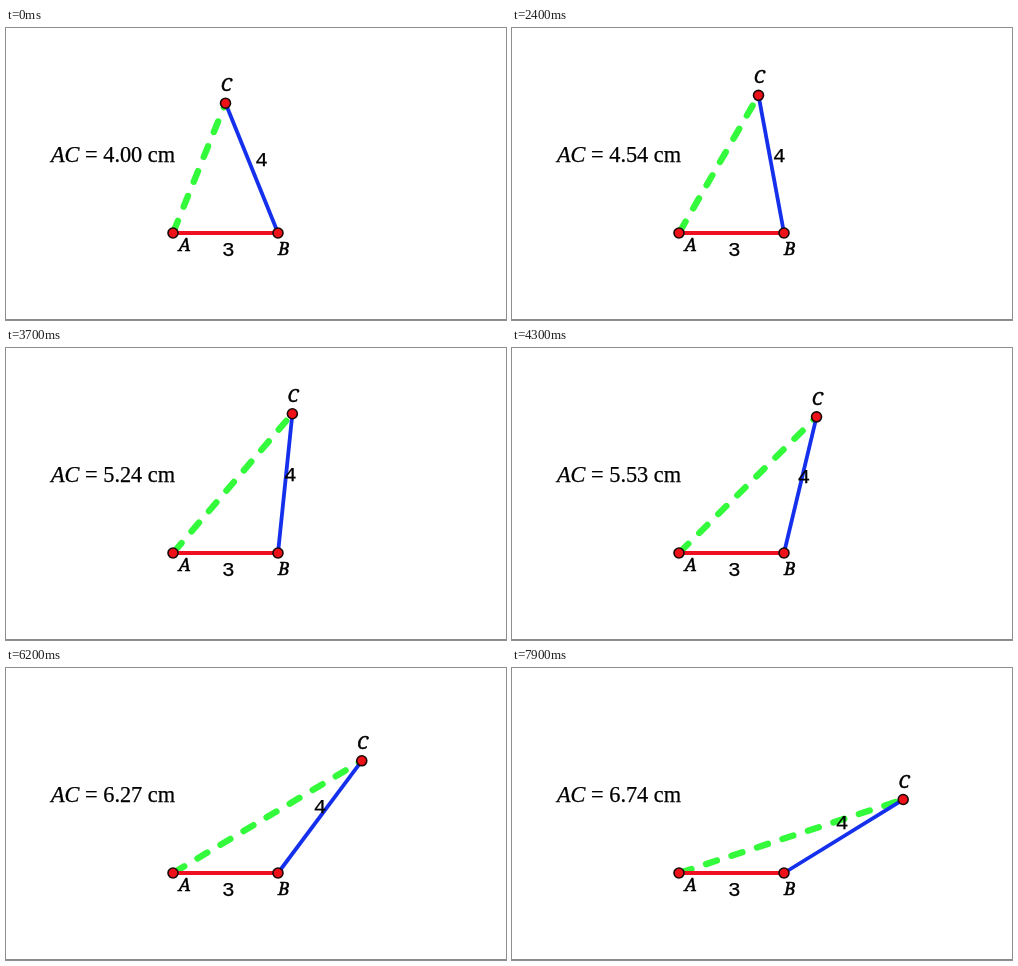
Recreate the animation shown at these times as an HTML page. Size 500 px wide and 292 px high, loop 8000 ms.

```html
<!DOCTYPE html>
<html lang="en">
<head>
<meta charset="utf-8">
<title>Hinged triangle</title>
<style>
  html, body { margin: 0; width: 100%; height: 100%; overflow: hidden; background: #fff; }
  svg { display: block; }
  text { stroke: #000; stroke-width: .25; }
  .measure { font: 22.3px "Liberation Serif", "Times New Roman", serif; }
  .label { font: 21px "Liberation Mono", "Courier New", monospace; text-anchor: middle; }
  .point { font: italic 17.5px "Noto Serif", serif; stroke-width: .5; }
  .dot { fill: #ee1118; stroke: #1a0808; stroke-width: 1.6; }
</style>
</head>
<body>
<svg width="500" height="292" viewBox="0 0 500 292">
  <path d="M0 291.5H500" stroke="#8a8a8a"/>
  <text class="measure" x="45" y="134"><tspan font-style="italic">AC</tspan> = <tspan id="length"></tspan> cm</text>
  <line id="ac" x1="167" y1="205" stroke="#33fb3c" stroke-width="6.4" stroke-linecap="round" stroke-dasharray="11.4 15.4" stroke-dashoffset="-1.7"/>
  <line id="bc" x1="272" y1="205" stroke="#1430ec" stroke-width="3.8"/>
  <path d="M167 205H272" stroke="#ee1020" stroke-width="3.8"/>
  <circle class="dot" cx="167" cy="205" r="5"/>
  <circle class="dot" cx="272" cy="205" r="5"/>
  <circle class="dot" id="dot" r="5"/>
  <text class="label point" x="178.6" y="223">A</text>
  <text class="label point" x="277.8" y="226.6">B</text>
  <text class="label" x="222.2" y="228">3</text>
  <text class="label point" id="c">C</text>
  <text class="label" id="four">4</text>
</svg>
<script>
const LOOP = 8000, STEP = 100, UNIT = 35;
const B = { x: 272, y: 205 };

// time, tilt of BC from vertical in degrees, offset of the "4" from the middle of BC
const keys = [
  [0, -22.02, 9.8, -9],
  [743, -31.38, 11.3, -9.5],
  [1600, -20.58, 9.4, -9],
  [3100, -1.66, 6.8, -8.5],
  [4300, 13.44, 3.5, -9],
  [5400, 26.64, 1.5, -10.5],
  [7000, 46.86, -1, -11.5],
  [7900, 58.34, -1.5, -13.7],
];

const $ = id => document.getElementById(id);
const set = (id, attrs) => {
  for (const name in attrs) $(id).setAttribute(name, attrs[name]);
};

function pose(time) {
  const i = Math.max(1, keys.findIndex(key => key[0] >= time));
  const from = keys[i - 1], to = keys[i];
  const part = (time - from[0]) / (to[0] - from[0]);
  return from.map((value, k) => value + (to[k] - value) * part);
}

function draw(now) {
  const time = Math.floor(now % LOOP / STEP) * STEP;
  const [, tilt, dx, dy] = pose(time);
  const angle = tilt * Math.PI / 180;
  const x = B.x + 4 * UNIT * Math.sin(angle);
  const y = B.y - 4 * UNIT * Math.cos(angle);

  set("ac", { x2: x, y2: y });
  set("bc", { x2: x, y2: y });
  set("dot", { cx: x, cy: y });
  set("c", { x: x + 1, y: y - 12 });
  set("four", { x: (x + B.x) / 2 + dx, y: (y + B.y) / 2 + dy + 6.8 });
  $("length").textContent = Math.sqrt(25 + 24 * Math.sin(angle)).toFixed(2);
}

const start = performance.now();
function tick() {
  draw(performance.now() - start);
  requestAnimationFrame(tick);
}
tick();
</script>
</body>
</html>
```
